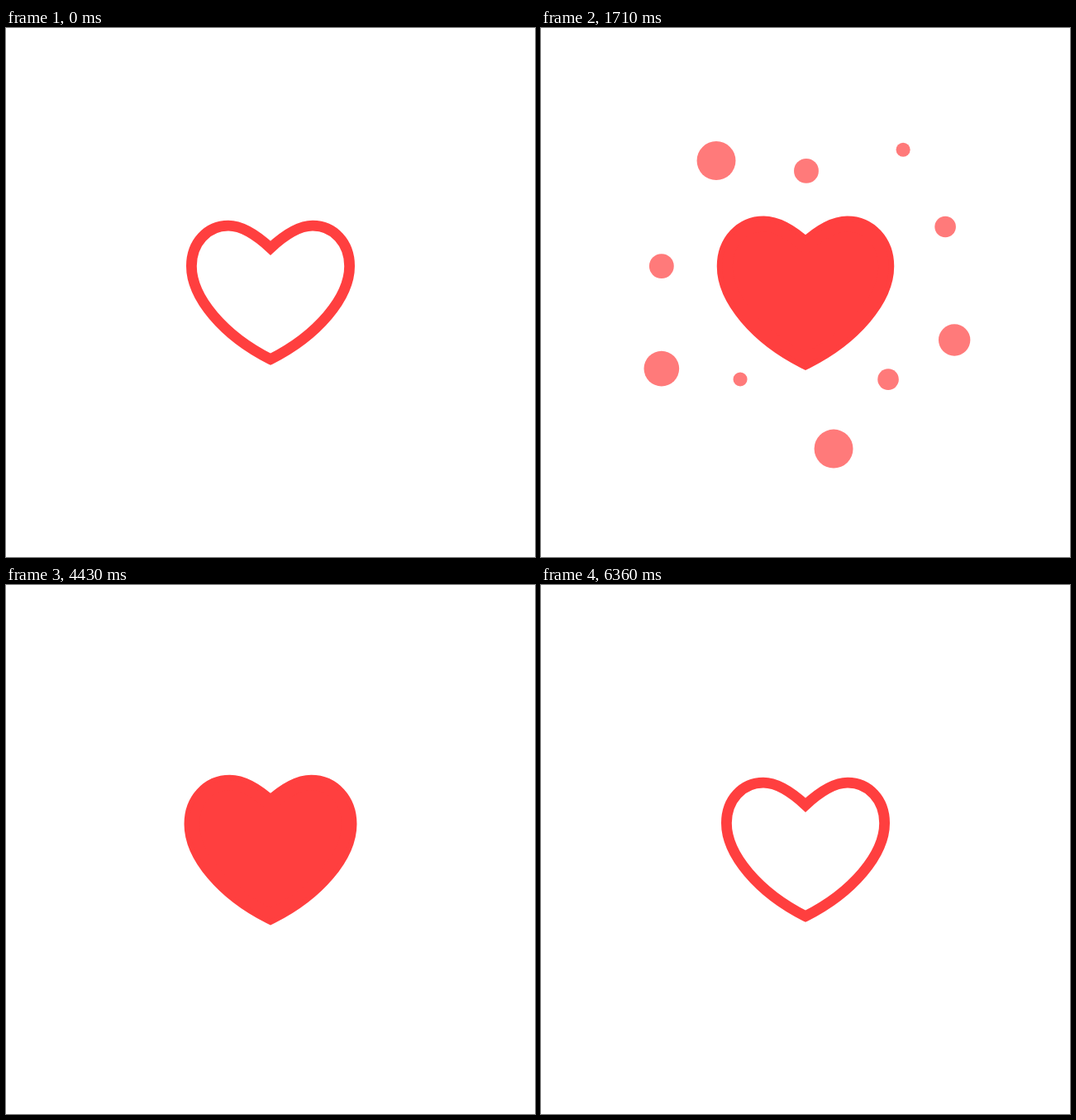
An HTML page with a canvas that plays this animation: 640 by 640 pixels, repeating every 7210 ms.

```html
<!DOCTYPE html>
<html lang="en">
<head>
<meta charset="utf-8">
<title>Like button</title>
<style>
  html, body { margin: 0; width: 100%; height: 100%; overflow: hidden; background: #fff; }
  canvas { display: block; width: 100vw; height: 100vh; }
</style>
</head>
<body>
<canvas id="stage" width="640" height="640"></canvas>
<script>
const ctx = document.getElementById('stage').getContext('2d');
const LOOP = 7210, LIKE = 700, UNLIKE = 4373;
const PRESS = 340, DEPTH = 0.137, PERIOD = 860, DECAY = 0.00131, SETTLE = 1640;
const UNIT = 640 / 300;
const RED = '#ff3f3f';

// Heart centre line, relative to the middle of the stage
const heart = new Path2D();
heart.moveTo(0, -53.7);
heart.bezierCurveTo(-17, -69.5, -34, -80.8, -51, -80.8);
heart.bezierCurveTo(-76.5, -80.8, -95.6, -60, -95.6, -32);
heart.bezierCurveTo(-95.6, 6, -57, 52, 0, 80.7);
heart.bezierCurveTo(57, 52, 95.6, 6, 95.6, -32);
heart.bezierCurveTo(95.6, -60, 76.5, -80.8, 51, -80.8);
heart.bezierCurveTo(34, -80.8, 17, -69.5, 0, -53.7);
heart.closePath();

// Dots: end x, end y, radius, delay
const dots = [
  [-55.8, -82.4, 11, 0], [0.5, -76, 7, 0], [63.6, -93, 4, 63],
  [87.4, -41.1, 6, 0], [93.1, 29.7, 9, 0], [51.7, 54.3, 6, 0],
  [17.6, 97.7, 11, 0], [-40.8, 54.3, 4, 0], [-90, 47.6, 10, 0],
  [-90, -16.5, 7, 0]
];

const ramp = (t, a, b) => Math.min(1, Math.max(0, (t - a) / (b - a)));
const easeOut = u => 1 - (1 - u) ** 3;

// Press in, then spring back
function bounce(t) {
  if (t <= 0) return 0;
  if (t < PRESS) return -DEPTH * Math.sin(t / PRESS * Math.PI / 2);
  const s = t - PRESS;
  const fade = 1 - ramp(s, SETTLE - 350, SETTLE);
  return -DEPTH * Math.exp(-DECAY * s) * Math.cos(2 * Math.PI * s / PERIOD) * fade;
}

function drawDots(t) {
  if (t < 1060 || t > 2690) return;
  ctx.fillStyle = RED;
  ctx.globalAlpha = 0.69 * (1 - ramp(t, 1950, 2690));
  for (const [x, y, r, delay] of dots) {
    const start = 1060 + delay;
    const k = UNIT * easeOut(ramp(t, start, start + 1190));
    ctx.beginPath();
    ctx.arc(x * k, y * k, r * UNIT, 0, 2 * Math.PI);
    ctx.fill();
  }
  ctx.globalAlpha = 1;
}

function drawHeart(t) {
  const scale = 1 + bounce(t - LIKE) + bounce(t - UNLIKE);
  const fill = ramp(t, LIKE + 105, LIKE + 360) - ramp(t, UNLIKE + 105, UNLIKE + 360);
  ctx.scale(scale, scale);
  ctx.lineJoin = 'miter';
  if (fill > 0) {
    const c = Math.round(255 - 192 * fill);
    ctx.fillStyle = ctx.strokeStyle = `rgb(255, ${c}, ${c})`;
    ctx.lineWidth = 12 * UNIT;
    ctx.stroke(heart);
    ctx.fill(heart);
  }
  ctx.strokeStyle = RED;
  ctx.lineWidth = 6 * UNIT;
  ctx.stroke(heart);
}

const begin = performance.now();
function frame() {
  const t = (performance.now() - begin) % LOOP;
  ctx.setTransform(1, 0, 0, 1, 0, 0);
  ctx.fillStyle = '#fff';
  ctx.fillRect(0, 0, 640, 640);
  ctx.translate(320, 320);
  drawDots(t);
  drawHeart(t);
  requestAnimationFrame(frame);
}
frame();
</script>
</body>
</html>
```
